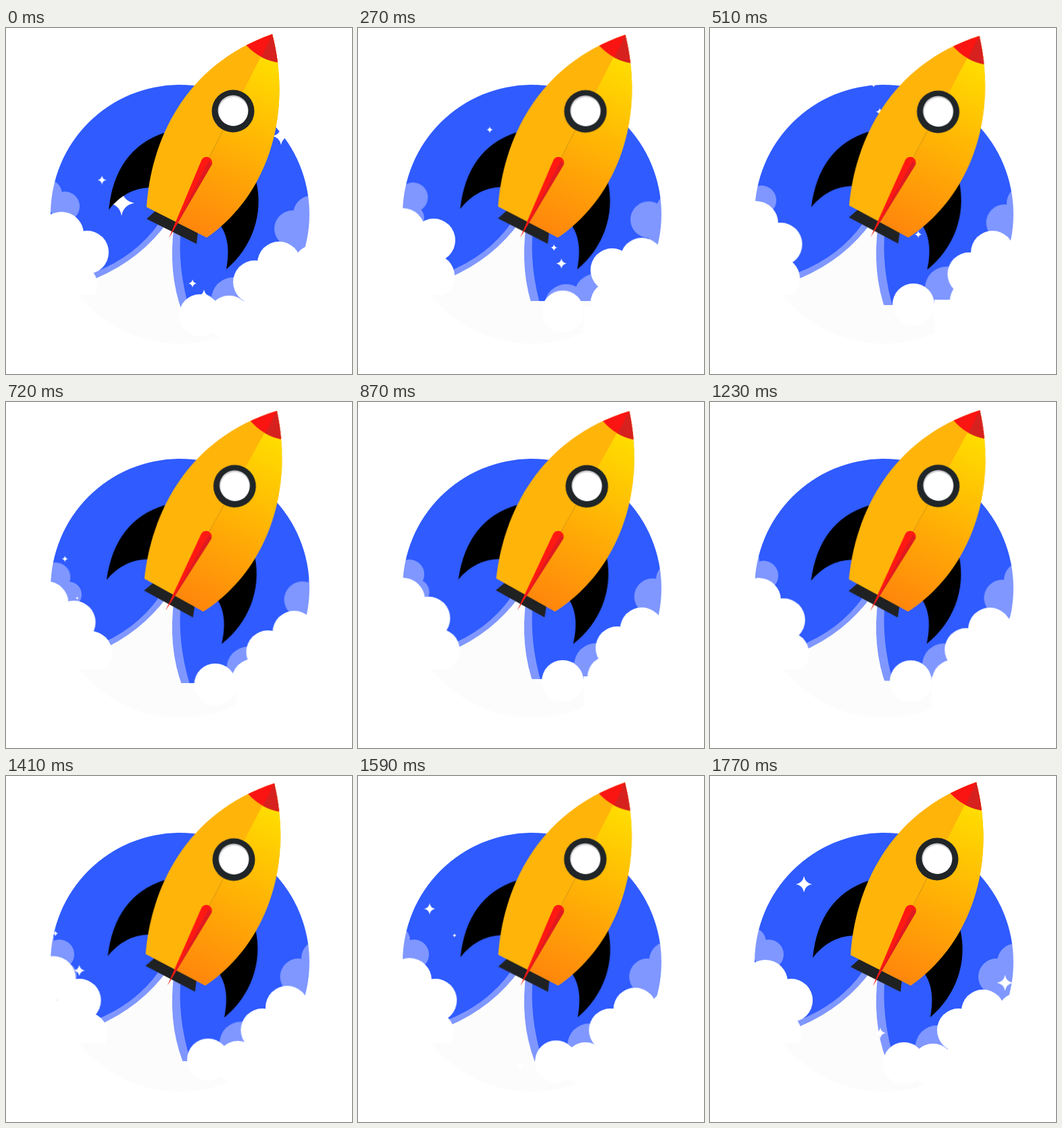
These frames come from a looping animation (512x512 px, 1.8 s). An HTML page:

```html
<!DOCTYPE html>
<html lang="en">
<head>
<meta charset="utf-8">
<title>Rocket</title>
<style>
html, body { margin: 0; width: 100%; height: 100%; overflow: hidden; background: #fff; }
svg { display: block; width: 100vmin; height: 100vmin; }

/* --kx and --ky scale or mirror the drift of a cloud layer */
.a, .b, .left-puff, .right-puff { --kx: 1; --ky: 1; animation: 1.8s linear infinite; }
.a { animation-name: drift-a; }
.b { animation-name: drift-b; }
.mirror { --kx: -1; }
.far { --kx: .75; --ky: .75; }
.far.mirror { --kx: -.7; }
.left-puff { animation-name: left-puff; }
.right-puff { animation-name: right-puff; }
.rocket {
  transform-origin: 296px 184px;
  animation: sway .9s cubic-bezier(.364, 0, .636, 1) infinite alternate;
}

@keyframes sway { to { transform: rotate(2.5deg); } }
@keyframes drift-a {
  0%, 98.33%, 100% { transform: translate(0, 0); }
  15% { transform: translate(calc(var(--kx) * 8px), calc(var(--ky) * -18px)); }
  28.33% { transform: translate(calc(var(--kx) * 15.5px), calc(var(--ky) * -12px)); }
  40% { transform: translate(calc(var(--kx) * 19.5px), calc(var(--ky) * -6px)); }
  58.33% { transform: translate(calc(var(--kx) * 11px), calc(var(--ky) * -19px)); }
  78.33% { transform: translate(calc(var(--kx) * 11.5px), 0); }
}
@keyframes drift-b {
  0%, 98.33%, 100% { transform: translate(0, 0); }
  15% { transform: translate(calc(var(--kx) * 16px), -5.5px); }
  28.33% { transform: translate(calc(var(--kx) * 14px), -16px); }
  40% { transform: translate(calc(var(--kx) * 22.5px), -7px); }
  58.33% { transform: translate(calc(var(--kx) * 8px), -18px); }
  78.33% { transform: translate(calc(var(--kx) * 12px), -5.5px); }
}
@keyframes left-puff {
  0%, 98.33%, 100% { transform: translate(103px, 380px); }
  15% { transform: translate(111px, 367px); }
  28.33% { transform: translate(101px, 371px); }
  40% { transform: translate(125px, 371px); }
  58.33% { transform: translate(111px, 363px); }
  78.33% { transform: translate(118px, 381px); }
}
@keyframes right-puff {
  0%, 98.33%, 100% { transform: translate(330px, 428px); }
  15% { transform: translate(376px, 407px); }
  28.33% { transform: translate(387px, 404px); }
  40% { transform: translate(366px, 412px); }
  58.33% { transform: translate(378px, 402px); }
  78.33% { transform: translate(343px, 424px); }
}
</style>
</head>
<body>
<svg viewBox="0 0 512 512">
  <defs>
    <mask id="disc" maskUnits="userSpaceOnUse" x="0" y="0" width="512" height="512">
      <circle cx="257.5" cy="275.5" r="191.5" fill="#fff"/>
    </mask>
    <clipPath id="hull"><path d="M208 265C214 170 262 55 394 9C425 130 386 248 297 310Z"/></clipPath>
    <linearGradient id="shade" gradientUnits="userSpaceOnUse" x1="390" y1="50" x2="275" y2="300">
      <stop offset="0" stop-color="#ffdc00"/>
      <stop offset=".5" stop-color="#ffb005"/>
      <stop offset="1" stop-color="#ff860c"/>
    </linearGradient>
  </defs>

  <g mask="url(#disc)">
    <path fill="#2f5bff" d="M60 80H455V470H60Z"/>

    <!-- exhaust -->
    <path fill="#7f97ff" d="M227 288Q192 338 130 362V480H290L272 418Q253 355 259 295Z"/>
    <path fill="#fcfcfc" d="M240 286Q200 342 134 370L100 385V480H290L261 421Q239 362 249 290Z"/>

    <!-- far clouds -->
    <g fill="#7f97ff">
      <circle class="b mirror" cx="61" cy="246" r="22"/>
      <circle class="a far mirror" cx="87" cy="264" r="22"/>
      <g class="left-puff"><circle cx="-32" cy="-86" r="19"/></g>
      <circle class="b" cx="452" cy="275" r="27"/>
      <g class="a far">
        <circle cx="424" cy="297" r="27"/>
        <path d="M424 290H480V350H424Z"/>
      </g>
      <circle class="a" cx="300" cy="429" r="32"/>
      <circle class="b" cx="336" cy="401" r="32"/>
    </g>

    <!-- near clouds -->
    <g fill="#fff">
      <circle class="b mirror" cx="82" cy="305" r="33"/>
      <g class="a mirror">
        <circle cx="120" cy="332" r="32"/>
        <path d="M40 332H110V360H128V480H40Z"/>
      </g>
      <g class="left-puff"><circle r="32"/></g>
      <path d="M60 395H200V480H60Z" fill="#fcfcfc"/>
      <path class="a" d="M225 422H480V500H225Z" fill="#fcfcfc"/>

      <g class="b">
        <circle cx="404" cy="348" r="32"/>
        <circle cx="456" cy="352" r="31"/>
        <circle cx="287" cy="425" r="31"/>
        <path d="M404 348H480V500H404ZM318 418H480V500H318Z"/>
      </g>
      <g class="a">
        <circle cx="368" cy="376" r="32"/>
        <path d="M380 362H480V500H352V400H380Z"/>
      </g>
      <g class="right-puff"><circle r="32"/></g>
    </g>

    <g id="stars" fill="#fff"></g>
  </g>

  <g class="rocket">
    <path d="M152 269Q161 180 234 155L212 236Q176 238 152 269Z"/>
    <path d="M370 226C382 275 364 325 326 357C331 330 329 308 316 290Z"/>
    <path fill="#202122" d="M222 270L208 282.500L282 319.500L284 302Z"/>
    <g clip-path="url(#hull)">
      <path fill="#ffb40a" d="M190 0H430V330H190Z"/>
      <path fill="url(#shade)" d="M394 9L241 311L300 330L430 200V0Z"/>
      <path fill="#fa1412" d="M394 0L350 20L356 26Q376 47 403 51H420V0Z"/>
      <path fill="#d6211f" d="M394 9L378 43Q390 49 403 51H420V9Z"/>
    </g>
    <path stroke="#d79310" d="M322 150L300 193"/>
    <circle cx="336" cy="123" r="31.5" fill="#202528"/>
    <circle cx="336" cy="122" r="22.5" fill="#d2d0d3"/>
    <circle cx="336.5" cy="123.5" r="21.5" fill="#fff"/>
    <path fill="#ff1912" d="M241 311L289.500 195A8 8 0 0 1 304 203Z"/>
    <path fill="#df1a20" d="M241 311L300 197L304.500 200Q305 202 304 203Z"/>
  </g>
</svg>
<script>
const LOOP = 1800, STEP = 30;
const layer = document.getElementById("stars");

// start time, x, y, radius, then end time, x, y, radius
const stars = [
  [0, 142, 225, 6.5, 540, 248, 76, 3],
  [0, 171, 259, 19, 540, 256, 116, 5],
  [0, 276, 378, 6, 540, 304, 272, 4],
  [0, 293, 397, 10, 540, 309, 300, 5],
  [0, 407, 160, 13, 150, 406, 110, 10],
  [630, 70, 254, 8, 840, 110, 203, 0],
  [630, 89, 315, 4, 840, 127, 257, 0],
  [1350, 62, 245, 3, 1800, 144.5, 154, 12.7],
  [1350, 97, 305, 10, 1680, 160, 210, 0],
  [1590, 440, 355, 8, 1800, 436, 298, 12.5],
  [1590, 240, 430, 8, 1800, 254, 372, 8]
];

const pose = (x, y, r) => `translate(${x}px, ${y}px) scale(${r})`;

for (const [t0, x0, y0, r0, t1, x1, y1, r1] of stars) {
  const star = document.createElementNS("http://www.w3.org/2000/svg", "path");
  star.setAttribute("d", "M0-1Q.15-.15 1 0Q.15 .15 0 1Q-.15 .15-1 0Q-.15-.15 0-1Z");
  layer.append(star);

  const from = t0 / LOOP, to = t1 / LOOP;
  const start = pose(x0, y0, r0), end = pose(x1, y1, r1);
  const frames = [{
    offset: from, transform: start, opacity: 1,
    easing: `steps(${(t1 - t0) / STEP})`
  }];
  // Opacity jumps at both ends of the star's life
  if (from > 0) frames.unshift(
    { offset: 0, transform: start, opacity: 0 },
    { offset: from, transform: start, opacity: 0 });
  frames.push({ offset: to, transform: end, opacity: 1 });
  if (to < 1) frames.push(
    { offset: to, transform: end, opacity: 0 },
    { offset: 1, transform: end, opacity: 0 });
  star.animate(frames, { duration: LOOP, iterations: Infinity });
}
</script>
</body>
</html>
```
